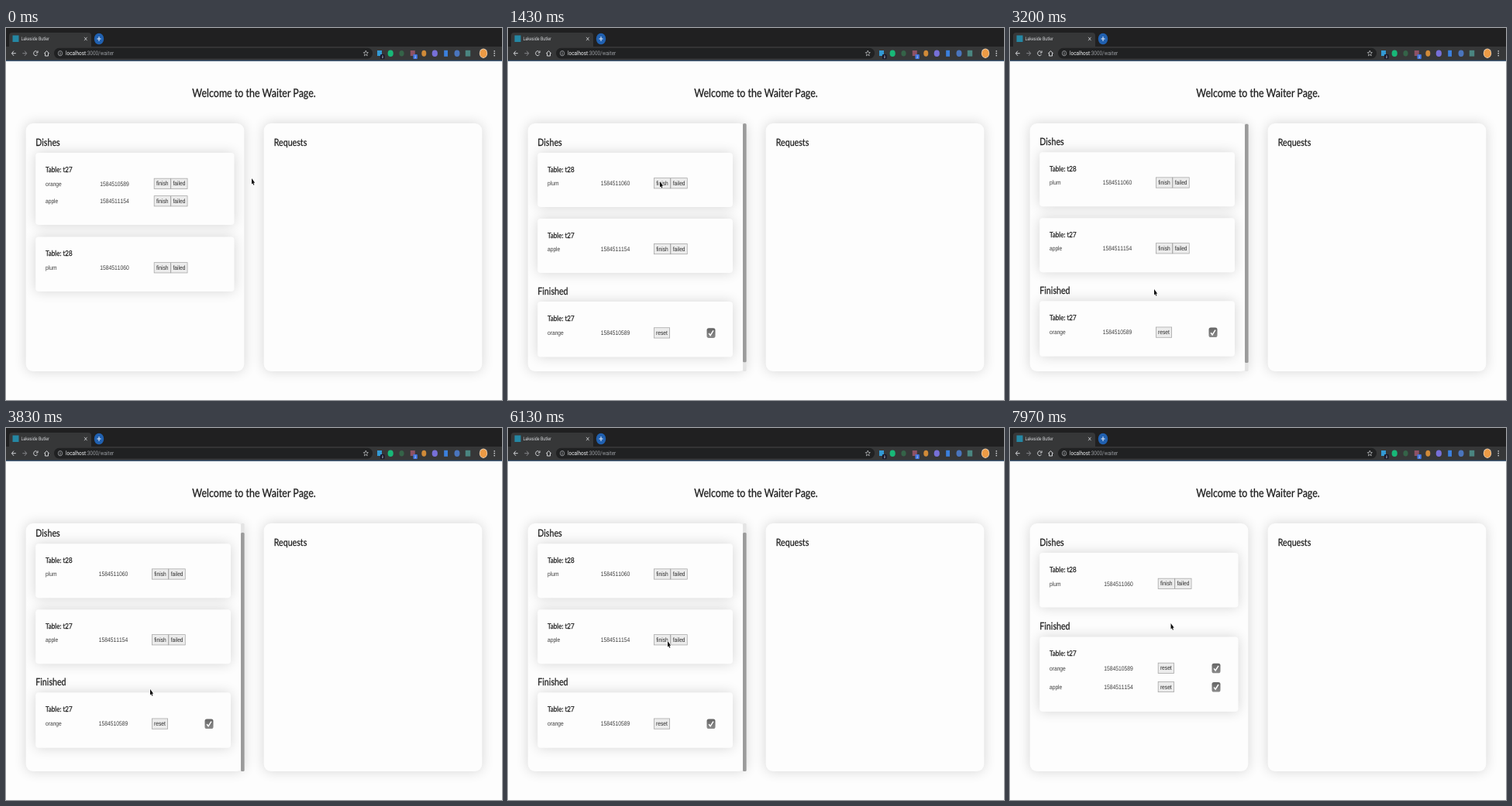
An HTML page with a canvas that plays this animation: 640 by 480 pixels, repeating every 8000 ms.

```html
<!DOCTYPE html>
<html lang="en">
<head>
<meta charset="utf-8">
<title>Waiter page</title>
<style>
  html, body { margin: 0; width: 100%; height: 100%; overflow: hidden; background: #fdfdfd; }
  canvas { display: block; width: 640px; height: 480px; }
</style>
</head>
<body>
<canvas id="stage" width="640" height="480"></canvas>
<script>
const ctx = document.getElementById('stage').getContext('2d');
const LOOP = 8000;
const FIRST_CLICK = 1100, SECOND_CLICK = 7100;
const SCROLL_START = 3194, SCROLL_END = 3300, SCROLL_MAX = 11.8;

// A 1440 x 900 screen shown on a 640 x 480 stage.
const SX = 640 / 1440, SY = 480 / 900;
const LATO = 'Lato, sans-serif';
const SANS = '"Liberation Sans", Arial, sans-serif';
const UI = 'Roboto, sans-serif';
const INK = '#1d1d1d';

// Pointer tip: time, x, y
const PATH = [
  [0, 317, 194], [400, 250, 199], [880, 196, 198],
  [2250, 196, 198], [2500, 199, 224], [2920, 186, 337],
  [3980, 186, 337], [4180, 86, 336], [4420, 33, 335], [4720, 80, 335],
  [5000, 54, 339], [5070, 43, 344], [5220, 33, 347], [5500, 110, 340],
  [5840, 207, 314], [6130, 206, 275], [6270, 200, 274],
  [7700, 200, 274], [7970, 207.5, 252], [8001, 208, 250]
];

const WIDE = { right: 294.5, time: 121.3, button: 190.8, check: 266 };
const NARROW = { right: 290, time: 119.8, button: 188, check: 262 };

function text(str, x, y, size, font, color, align = 'left') {
  ctx.save();
  ctx.translate(x, y);
  ctx.scale(SX, SY);
  ctx.font = `${size}px ${font}`;
  ctx.textAlign = align;
  ctx.textRendering = 'geometricPrecision';
  ctx.fontKerning = font === SANS ? 'none' : 'normal';
  ctx.fillStyle = color;
  ctx.fillText(str, 0, 0);
  if (font === LATO) {
    // Slightly heavier than the regular weight.
    ctx.strokeStyle = color;
    ctx.lineWidth = 0.5;
    ctx.strokeText(str, 0, 0);
  }
  const width = ctx.measureText(str).width * SX;
  ctx.restore();
  return width;
}

function rect(x, y, w, h, color) {
  ctx.fillStyle = color;
  ctx.fillRect(x, y, w, h);
}

function rounded(x, y, w, h, r, color) {
  ctx.beginPath();
  ctx.roundRect(x, y, w, h, r);
  ctx.fillStyle = color;
  ctx.fill();
}

function oval(x, y, rx, ry, color) {
  ctx.beginPath();
  ctx.ellipse(x, y, rx, ry, 0, 0, 7);
  ctx.fillStyle = color;
  ctx.fill();
}

function line(points, color, width = 1) {
  ctx.beginPath();
  points.forEach(([x, y]) => ctx.lineTo(x, y));
  ctx.strokeStyle = color;
  ctx.lineWidth = width;
  ctx.stroke();
}

function raised(x, y, w, h, r) {
  ctx.save();
  ctx.shadowColor = 'rgba(0,0,0,0.16)';
  ctx.shadowBlur = 16;
  rounded(x, y, w, h, r, '#fdfdfd');
  ctx.restore();
}

function drawTabs() {
  rect(0, 0, 640, 24, '#202021');
  rounded(4, 6, 106, 20, [4, 4, 0, 0], '#363738');
  rect(8.5, 9.5, 8, 8.5, '#2587a3');
  text('Lakeside Butler', 19.5, 16.3, 12, UI, '#d5d7da');
  line([[101, 11.8], [104.6, 16.2]], '#d0d2d5', 0.8);
  line([[104.6, 11.8], [101, 16.2]], '#d0d2d5', 0.8);
  oval(120, 14, 6.2, 7.3, '#2060b0');
  line([[117.4, 14], [122.6, 14]], '#e8eef8');
  line([[120, 11], [120, 17]], '#e8eef8');
}

function drawNavigation() {
  const light = '#d2d4d7', dim = '#85878a';
  line([[12.8, 32.7], [7.6, 32.7]], light);
  line([[10, 29.6], [7.4, 32.7], [10, 35.8]], light);
  line([[21.3, 32.7], [26.5, 32.7]], dim);
  line([[24.1, 29.6], [26.7, 32.7], [24.1, 35.8]], dim);
  ctx.beginPath();
  ctx.ellipse(38.2, 32.7, 2.5, 3, 0, 0.5, 5.5);
  ctx.strokeStyle = light;
  ctx.stroke();
  line([[41, 29.4], [41, 32], [38.8, 32]], light);
  line([[49.3, 33], [52.5, 29.5], [55.7, 33]], light);
  line([[50.5, 32.4], [50.5, 36], [54.5, 36], [54.5, 32.4]], light);
}

function drawAddress() {
  rounded(62, 25.8, 411, 13.6, 6.5, '#202122');
  ctx.beginPath();
  ctx.ellipse(70, 32.7, 2.7, 3.2, 0, 0, 7);
  ctx.strokeStyle = '#b4b7bb';
  ctx.lineWidth = 0.7;
  ctx.stroke();
  line([[70, 32.2], [70, 34.6]], '#b4b7bb', 0.8);
  rect(69.6, 30.7, 0.8, 0.9, '#b4b7bb');
  const host = text('localhost', 77, 35.3, 14.4, UI, '#eceef0');
  text(':3000/waiter', 77 + host, 35.3, 14.4, UI, '#989ba0');
  ctx.beginPath();
  for (let i = 0; i < 10; i++) {
    const r = i % 2 ? 0.45 : 1, a = i * Math.PI / 5 - Math.PI / 2;
    ctx.lineTo(464.3 + 3.2 * r * Math.cos(a), 32.8 + 3.8 * r * Math.sin(a));
  }
  ctx.closePath();
  ctx.strokeStyle = '#c8cacd';
  ctx.lineWidth = 0.7;
  ctx.stroke();
}

function badge(x, y, str, color) {
  rounded(x, y, 5.5, 6, 1, color);
  text(str, x + 2.75, y + 4.9, 9, UI, '#e8e8ee', 'center');
}

function drawExtensions() {
  rect(479, 29, 6, 7, '#3399d4');
  badge(483, 34, '0', '#17182c');
  oval(496.2, 32.7, 3.6, 4.3, '#18b878');
  oval(510.5, 32.7, 3.1, 3.8, '#356348');
  rect(521.8, 29, 6, 7, '#8d5265');
  badge(525.4, 34, '3', '#3f73df');
  oval(539.3, 32.7, 3, 4, '#d08a38');
  oval(553.3, 32.7, 3.6, 4.3, '#7770d8');
  rect(565.2, 28.8, 4.8, 8, '#3b80dd');
  oval(582, 32.7, 3.5, 4.2, '#4a75bd');
  rect(592.8, 28.8, 6.4, 7.8, '#4a8580');
  oval(616, 32.7, 5.2, 6.2, '#e9d5bf');
  oval(616, 32.7, 4.5, 5.4, '#ed9b45');
  for (const y of [29.8, 32.7, 35.6]) oval(630.2, y, 0.8, 0.9, '#d2d4d7');
}

function drawBrowser() {
  drawTabs();
  rect(0, 24, 640, 18, '#363738');
  drawNavigation();
  drawAddress();
  drawExtensions();
  rect(0, 41.5, 640, 1.3, '#2a4868');
}

function panel(x) {
  raised(x, 123, 281.6, 320, 9);
}

function heading(str, x, y) {
  text(str, x, y + 4.6, 24, LATO, INK);
}

function card(top, bottom, title, cols) {
  raised(38.2, top, cols.right - 38.2, bottom - top, 4);
  text(title, 51, top + 24.7, 18, LATO, INK);
}

function button(x, y, w, label) {
  rect(x, y - 7, w, 14, '#a0a0a0');
  rect(x + 0.7, y - 6.3, w - 1.4, 12.6, '#ececec');
  text(label, x + w / 2, y + 2.6, 15, SANS, '#2c2c2c', 'center');
}

function checkbox(x, y) {
  const shade = ctx.createLinearGradient(0, y - 6, 0, y + 6);
  shade.addColorStop(0, '#666');
  shade.addColorStop(1, '#8a8a8a');
  rounded(x - 5.5, y - 6.3, 11, 12.6, 2.6, shade);
  line([[x - 2.9, y + 0.4], [x - 0.9, y + 3], [x + 3, y - 3.2]], '#fff', 1.5);
}

function row(y, dish, time, cols, done) {
  text(dish, 51, y + 2.8, 15, SANS, '#3c3c3c');
  text(time, cols.time, y + 2.8, 15.2, SANS, '#3c3c3c');
  if (done) {
    button(cols.button, y, 21, 'reset');
    checkbox(cols.check, y + 0.2);
  } else {
    button(cols.button, y, 22, 'finish');
    button(cols.button + 21.6, y, 22, 'failed');
  }
}

const orange = (y, cols, done) => row(y, 'orange', '1584510589', cols, done);
const apple = (y, cols, done) => row(y, 'apple', '1584511154', cols, done);
const plum = (y, cols) => row(y, 'plum', '1584511060', cols, false);

function drawOpen() {
  card(161, 254, 'Table: t27', WIDE);
  orange(200.8, WIDE, false);
  apple(223.3, WIDE, false);
  card(269.5, 340, 'Table: t28', WIDE);
  plum(309.3, WIDE);
}

function drawOneDone() {
  card(161, 231, 'Table: t28', NARROW);
  plum(200.3, NARROW);
  card(246, 316, 'Table: t27', NARROW);
  apple(285.1, NARROW, false);
  heading('Finished', 38.3, 339);
  card(353, 424.5, 'Table: t27', NARROW);
  orange(393.4, NARROW, true);
}

function drawTwoDone() {
  card(161, 231.5, 'Table: t28', WIDE);
  plum(200.8, WIDE);
  heading('Finished', 38.3, 255.3);
  card(269.5, 366, 'Table: t27', WIDE);
  orange(309.8, WIDE, true);
  apple(334, WIDE, true);
}

function drawDishes(t) {
  const scrolls = t >= FIRST_CLICK && t < SECOND_CLICK;
  const part = Math.min(1, Math.max(0, (t - SCROLL_START) / (SCROLL_END - SCROLL_START)));
  const scroll = scrolls ? SCROLL_MAX * part : 0;

  panel(25.7);
  ctx.save();
  ctx.beginPath();
  ctx.roundRect(25.7, 123, 281.6, 320, 9);
  ctx.clip();
  ctx.translate(0, -scroll);
  heading('Dishes', 38.3, 147);
  if (t < FIRST_CLICK) drawOpen();
  else if (scrolls) drawOneDone();
  else drawTwoDone();
  ctx.restore();

  if (scrolls) {
    rounded(303, 123, 4.6, 320, 1.5, '#e4e4e4');
    rounded(303, 123.2 + scroll, 4.6, 308, 1.5, '#9b9b9b');
  }
}

// Monotone cubic through the path, so rests stay still and turns do not overshoot.
function slope(k, axis) {
  if (k === 0 || k === PATH.length - 1) return 0;
  const rate = i => (PATH[i + 1][axis] - PATH[i][axis]) / (PATH[i + 1][0] - PATH[i][0]);
  const a = rate(k - 1), b = rate(k);
  return a * b > 0 ? 2 * a * b / (a + b) : 0;
}

function pointerAt(t) {
  const i = PATH.findIndex(p => p[0] > t) - 1;
  const from = PATH[i], to = PATH[i + 1];
  const span = to[0] - from[0], u = (t - from[0]) / span, v = 1 - u;
  return [1, 2].map(axis =>
    from[axis] * v * v * (1 + 2 * u) + to[axis] * u * u * (3 - 2 * u) +
    span * u * v * (slope(i, axis) * v - slope(i + 1, axis) * u));
}

function drawPointer(t) {
  const [x, y] = pointerAt(t);
  ctx.save();
  ctx.translate(x, y);
  ctx.beginPath();
  const shape = [[0, 0], [0, 7.6], [1.4, 6.2], [2.4, 8.8], [3.4, 8.2], [2.4, 5.8], [4.2, 5.7]];
  shape.forEach(([px, py]) => ctx.lineTo(px, py));
  ctx.closePath();
  ctx.lineJoin = 'round';
  ctx.strokeStyle = '#fff';
  ctx.lineWidth = 1.2;
  ctx.stroke();
  ctx.fillStyle = '#0c0c0c';
  ctx.fill();
  ctx.restore();
}

function draw() {
  const t = performance.now() % LOOP;
  rect(0, 0, 640, 480, '#fdfdfd');
  drawBrowser();
  text('Welcome to the Waiter Page.', 320, 89.2, 28, LATO, INK, 'center');
  drawDishes(t);
  panel(332.7);
  heading('Requests', 345.7, 147);
  drawPointer(t);
  requestAnimationFrame(draw);
}

draw();
</script>
</body>
</html>
```
